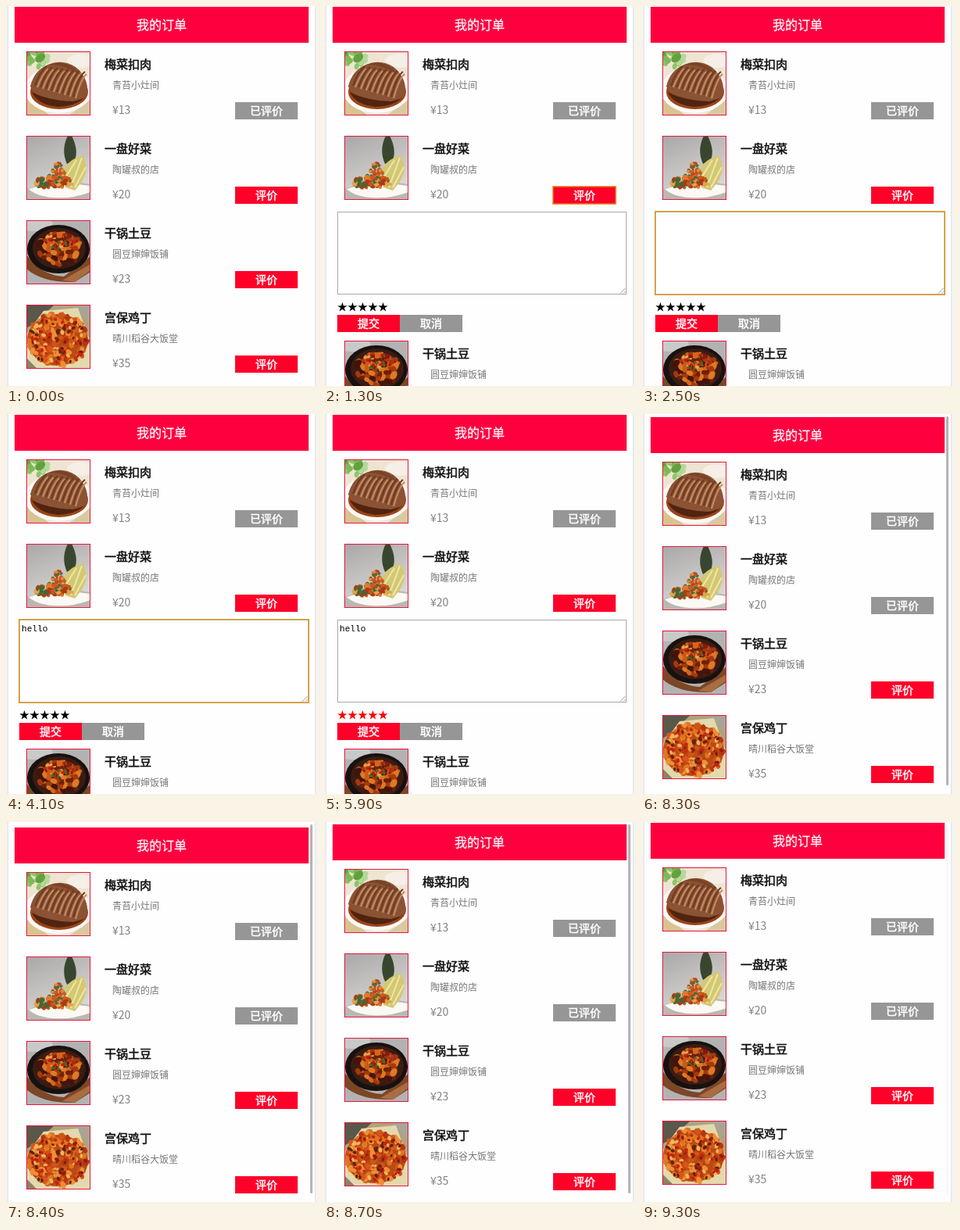
An HTML page that plays this animation: 399 by 486 pixels, repeating every 10000 ms.

```html
<!DOCTYPE html>
<html lang="zh-CN">
<head>
<meta charset="utf-8">
<title>我的订单</title>
<style>
  html, body { margin: 0; width: 100%; height: 100%; overflow: hidden; background: #f3f3f3; }
  svg { display: block; width: 399px; height: 486px; }
  text { font-family: "Noto Sans CJK SC", "Noto Sans CJK", "Noto Sans", sans-serif; }
  .head { font-size: 16px; fill: #fff; text-anchor: middle; stroke: #fff; stroke-width: 0.25px; }
  .dish { font-size: 15px; fill: #111; stroke: #111; stroke-width: 0.55px; }
  .shop { font-size: 12px; fill: #777; }
  .price { font-size: 14px; fill: #808080; }
  .btn { font-size: 14px; fill: #fff; text-anchor: middle; stroke: #fff; stroke-width: 0.5px; }
  .stars { font-size: 13px; }
  .typed { font: 11.11px "Liberation Mono", monospace; fill: #000; }
</style>
</head>
<body>
<svg id="stage" viewBox="0 0 399 486"></svg>
<script>
const LOOP = 10000, HEAD = '#ff003f', RED = '#ff0029', GREY = '#969696', FOCUS = '#e0a030';
const stage = document.getElementById('stage');
const $ = id => document.getElementById(id);

const rect = (x, y, w, h, fill, more = '') =>
  `<rect x="${x}" y="${y}" width="${w}" height="${h}" fill="${fill}" ${more}/>`;
const oval = (x, y, rx, ry, fill, more = '') =>
  `<ellipse cx="${x}" cy="${y}" rx="${rx}" ry="${ry}" fill="${fill}" ${more}/>`;
const path = (d, fill, more = '') => `<path d="${d}" fill="${fill}" ${more}/>`;
const text = (cls, x, y, str, more = '') =>
  `<text class="${cls}" x="${x}" y="${y}" ${more}>${str}</text>`;
const button = (x, y, fill, label) =>
  rect(x, y, 80, 22, fill) + text('btn', x + 40, y + 16, label);

function random(seed) {
  return () => (seed = (seed * 16807) % 2147483647) / 2147483647;
}

// Scatter small tilted ovals inside a larger oval.
function pieces(seed, n, cx, cy, rx, ry, size, colors) {
  const rnd = random(seed);
  let out = '';
  for (let i = 0; i < n; i++) {
    const a = rnd() * Math.PI * 2, r = Math.sqrt(rnd());
    const x = (cx + rx * r * Math.cos(a)).toFixed(1);
    const y = (cy + ry * r * Math.sin(a)).toFixed(1);
    const s = size * (0.6 + 0.6 * rnd());
    const fill = colors[Math.floor(rnd() * colors.length)];
    out += oval(x, y, s.toFixed(1), (s * 0.7).toFixed(1), fill,
      `transform="rotate(${Math.floor(rnd() * 180)} ${x} ${y})"`);
  }
  return out;
}

function pork() {
  let slices = '';
  for (let i = 0; i < 8; i++) {
    const x = 20 + i * 7;
    slices += path(`M${x - 9} ${44 + i * 2}Q${x - 2} ${25 + i} ${x + 6} ${19 + i}`, 'none',
      'stroke="#6b3a20" stroke-width="2"') +
      path(`M${x - 6} ${46 + i * 2}Q${x + 1} ${28 + i} ${x + 8} ${22 + i}`, 'none',
      'stroke="#c48b62" stroke-width="2.2"');
  }
  return rect(0, 0, 82, 82, '#eee4d2') +
    path('M0 60L30 82H0Z', '#d9c391') +
    path('M82 62V82H54Z', '#d9c9a0') +
    pieces(11, 18, 13, 10, 17, 11, 6, ['#7db955', '#8cc668', '#b5d99a', '#62a13d']) +
    oval(70, 12, 18, 9, '#f5efe8') +
    oval(41, 49, 43, 30, '#fbf9f5') +
    oval(42, 52, 37, 22, '#9a4518') +
    path('M5 45Q10 24 28 17Q46 9 63 20Q80 34 78 54Q70 66 46 66Q16 64 5 45Z', '#8b5334') +
    slices +
    path('M28 17Q46 10 62 22L70 30Q48 16 28 17Z', '#7a4226') +
    path('M7 52Q28 63 60 64L74 60Q60 71 40 71Q14 68 7 52Z', '#4f2410');
}

function fan() {
  return rect(0, 0, 82, 82, 'url(#wall)') +
    path('M0 68L40 56L82 62V82H0Z', '#b9b8b3') +
    path('M3 68Q30 60 50 60L82 64V72Q58 81 34 79Q12 77 3 68Z', '#faf9f4') +
    path('M53 0H58Q67 18 62 31L52 36Q44 18 53 0Z', '#39462f') +
    path('M47 46Q52 31 72 25Q82 42 70 60L62 70L50 66Z', '#d3c873') +
    path('M57 66L71 28M62 66L76 40M51 52L64 31', 'none', 'stroke="#eee6a8" stroke-width="2"') +
    pieces(23, 70, 36, 60, 24, 8, 3.4, ['#c9551c', '#e07b2d', '#a93c17', '#3e6b35', '#e6a24d']) +
    pieces(31, 34, 42, 46, 9, 12, 3.2, ['#cf5a1f', '#e58a3b', '#b4481b', '#47703a']);
}

function pan() {
  return rect(0, 0, 82, 82, '#b3b2b3') +
    oval(10, 5, 24, 9, '#c9c9ca') +
    path('M0 44Q18 70 48 72L82 46V66L62 79Q20 80 0 62Z', '#7c4726') +
    path('M46 77L82 56V64L62 79Z', '#a96d41') +
    oval(41, 37, 40, 31, '#17110f') +
    oval(42, 36, 34, 26, '#3a1c13') +
    pieces(47, 100, 42, 36, 28, 20, 5,
      ['#c95a17', '#de7a25', '#a5380e', '#d4671b', '#6d210b', '#451409']) +
    pieces(53, 34, 44, 27, 21, 11, 2.5, ['#c11f10', '#8d160b', '#e9a34b', '#4d6a2a']);
}

function chicken() {
  return rect(0, 0, 82, 82, '#b0a27c') +
    path('M0 0H36L10 24L0 30Z', '#5a584a') +
    path('M60 0H82V24Z', '#a8a596') +
    path('M22 8L66 4L82 48V82H0V38Z', '#e3d9ae') +
    path('M0 68L14 82H0Z', '#8c8266') +
    oval(40, 45, 39, 33, '#b84a14') +
    pieces(71, 150, 40, 44, 38, 34, 4.4, ['#e0761f', '#cf5515', '#ee8f35', '#b93410', '#d8551a']) +
    pieces(83, 75, 40, 45, 37, 33, 2.8, ['#8f1d0c', '#5d2410', '#c71f12', '#f0b45f']);
}

const orders = [
  ['梅菜扣肉', '青苔小灶间', 13, pork],
  ['一盘好菜', '陶罐叔的店', 20, fan],
  ['干锅土豆', '圆豆婶婶饭铺', 23, pan],
  ['宫保鸡丁', '晴川稻谷大饭堂', 35, chicken]
];

function order([dish, shop, price, photo], i) {
  const y = 58 + i * 108;
  const rate = button(293, y + 65, RED, '评价');
  const rated = button(293, y + 65, GREY, '已评价');
  return `<g transform="translate(26 ${y})"><g clip-path="url(#frame)">${photo()}</g>
    ${rect(0.5, 0.5, 81, 81, 'none', 'stroke="#e8173f"')}</g>` +
    text('dish', 126, y + 22, dish) +
    text('shop', 136, y + 48, shop) +
    text('price', 136, y + 80, '¥' + price) +
    (i === 1 ? `<g id="rate">${rate}</g><g id="rated">${rated}</g>` : i ? rate : rated);
}

const form = `<g id="form">
  ${rect(17.5, 263.5, 369, 105, '#fff', 'stroke="#a9a9a9"')}
  ${path('M379 367.5L385.5 361M383 367.5L385.5 365', 'none', 'stroke="#999"')}
  ${rect(16.75, 262.75, 370.5, 106.5, 'none', `id="boxFocus" stroke="${FOCUS}" stroke-width="1.5"`)}
  ${text('typed', 20, 278, '', 'id="typed"')}
  ${rect(20, 267, 1, 13, '#000', 'id="caret"')}
  ${text('stars', 17, 389, '★★★★★', 'id="stars"')}
  ${button(17, 395, RED, '提交')}${button(97, 395, GREY, '取消')}
  ${rect(292.75, 230.75, 80.5, 22.5, 'none', `id="rateFocus" stroke="${FOCUS}" stroke-width="1.5"`)}
</g>`;

stage.innerHTML = `<defs>
    <clipPath id="frame"><rect width="82" height="82"/></clipPath>
    <linearGradient id="wall" x2="0.4" y2="1">
      <stop offset="0" stop-color="#a9a8a8"/><stop offset="1" stop-color="#dad9d6"/>
    </linearGradient>
  </defs>
  ${rect(0, 0, 399, 486, '#f3f3f3')}${rect(2, 0, 394, 486, '#e2e2e2')}${rect(3, 0, 392, 486, '#fefefe')}
  <g id="list">
    ${rect(11, 1, 376, 46, HEAD)}${text('head', 199, 30, '我的订单')}
    ${orders.slice(0, 2).map(order).join('')}
    ${form}
    <g id="rest">${orders.slice(2).map((o, i) => order(o, i + 2)).join('')}</g>
  </g>
  ${rect(389, 0, 3, 472, '#b4b4b4', 'id="bar" rx="1.5"')}`;

const show = (id, on) => $(id).setAttribute('visibility', on ? 'inherit' : 'hidden');
const move = (id, y) => $(id).setAttribute('transform', `translate(0 ${y})`);
const between = (t, a, b) => t >= a && t < b;
const step = (t, first, ...keys) => keys.reduce((v, [at, next]) => t >= at ? next : v, first);

const keyTimes = [3000, 3100, 3400, 3500, 3700];

function draw(t) {
  const open = between(t, 1300, 7000), writing = between(t, 2000, 5900);
  const count = keyTimes.filter(k => t >= k).length;
  const blinkOff = between(t, 2500, 2900) || between(t, 4100, 4600) || between(t, 5000, 5500);

  show('form', open);
  show('rateFocus', open && t < 2000);
  show('boxFocus', open && writing);
  show('caret', open && writing && !blinkOff);
  show('rate', t < 7000);
  show('rated', t >= 7000);
  $('typed').textContent = 'hello'.slice(0, count);
  $('caret').setAttribute('x', 20 + Math.round(count * 6.667));
  $('stars').setAttribute('fill', t >= 5900 ? '#f00' : '#000');
  move('rest', open ? 154 : 0);

  move('list', step(t, 0, [8300, 3], [8400, 6], [8700, 2], [8800, 0]));
  $('bar').setAttribute('y', step(t, 3, [8800, 6]));
  $('bar').setAttribute('opacity', step(t, 0, [8300, 1], [9200, 0.5], [9300, 0.08]));
}

function tick() {
  draw(performance.now() % LOOP);
  requestAnimationFrame(tick);
}
tick();
</script>
</body>
</html>
```
